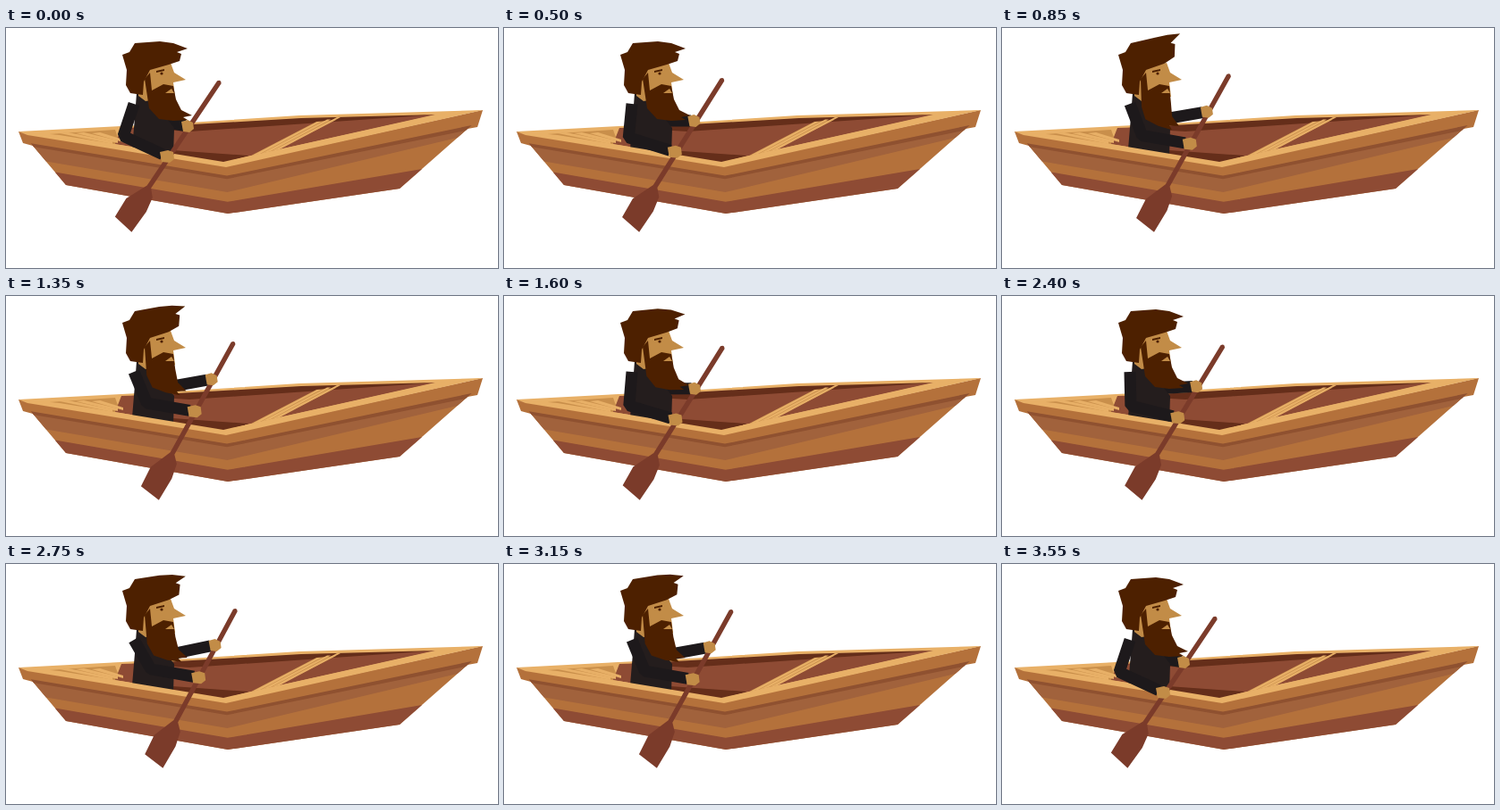
Write an HTML page that moves like this. It is 550 px wide and 269 px high and loops after 3600 ms.

```html
<!DOCTYPE html>
<html lang="en">
<head>
<meta charset="utf-8">
<title>Rowing</title>
<style>
  html, body { margin: 0; width: 100%; height: 100%; overflow: hidden; background: #fff; }
  svg { display: block; width: 550px; height: 269px; }
  .light { fill: #e8b067; } .oak { fill: #c98f4b; } .wood { fill: #b4713b; }
  .dark { fill: #8e4b34; } .shade { fill: #652e1a; }
  .skin { fill: #c28c47; } .hair { fill: #4d2000; } .oar { fill: #7b3b2a; }
  .coat { fill: #241d1d; }
  .sleeve { fill: none; stroke: #1d191b; stroke-width: 13; stroke-linejoin: bevel; }
</style>
</head>
<body>
<svg viewBox="0 0 550 269">
  <path class="light" d="M14 116L205 106 328 98 533 92 243 152Z"/>
  <path class="oak" d="M48 119L122 114 128 131Z"/>
  <path class="dark" d="M129 112L205 110 482 97 243 150 122 130Z"/>
  <path class="shade" d="M140 112L330 101 482 97 205 116Z"/>
  <path class="shade" d="M186 137L272 143 243 151 186 142Z"/>
  <path class="oak" d="M274 143L347 105 369 103 302 137Z"/>
  <g id="planks" class="light"></g>
  <path id="farArm" class="sleeve"/>
  <path class="coat" d="M146 73L144 100 141 136 187 144 188 112 160 76Z"/>
  <path class="wood" d="M14 116L19 129 30 132 247 168 516 113 527 111 533 92 246 155Z"/>
  <g id="hull"></g>
  <path class="light" d="M14 116L60 120 243 150 480 97 533 92 246 156 24 120Z"/>
  <path id="oar" class="oar" d="M-2.7-95Q0-99 2.7-95L2.7 46 10 54 13 71 12 99-13 95-14 71-2.7 46Z"/>
  <path id="farHand" class="skin" d="M-7-5L0-7 6-4 7 3 2 7-5 6Z"/>
  <path class="skin" d="M148 54L164 43 184 39 188 50 201 58 187 61 189 77 156 82 148 76Z"/>
  <path id="beard" class="hair"/>
  <path class="skin" d="M178 73L185 68 188 73Z"/>
  <path class="hair" d="M168 48L177 46 177 48 168 50Z"/>
  <circle class="hair" cx="174" cy="51" r="1.6"/>
  <path id="hair" class="hair"/>
  <path id="nearArm" class="sleeve"/>
  <path id="nearHand" class="skin" d="M-8-5L1-7 7-5 8 3 3 7-6 6Z"/>
</svg>
<script>
const LOOP = 3600, STEP = 50, STROKE = 1800, GUST = 605;
const $ = id => document.getElementById(id);
const clamp = x => Math.max(0, Math.min(1, x));
const mix = (a, b, k) => a + (b - a) * k;
const mixPt = (a, b, k) => [mix(a[0], b[0], k), mix(a[1], b[1], k)];
const line = pts => 'M' + pts.map(p => p.map(n => n.toFixed(2)).join(' ')).join('L');
const place = (id, [x, y], deg = 0) =>
  $(id).setAttribute('transform', `translate(${x} ${y}) rotate(${deg})`);
const shape = (id, pts) => $(id).setAttribute('d', line(pts));

// Hull boards are V strips between seam (0) and keel (1).
const rib = (f, bow = f) => [
  mixPt([30, 132], [67, 176], f), mixPt([247, 168], [248, 208], f), mixPt([516, 113], [440, 180], bow)];
const board = (fill, top, end, bow) =>
  `<path fill="${fill}" d="${line([...rib(top), ...rib(end, bow).reverse()])}Z"/>`;
$('hull').innerHTML = board('#b4713b', 0, 1) + board('#a1623c', -0.04, 0.4, 0.15) +
  board('#8f5130', -0.06, 0.03) + board('#8e4b34', 0.67, 1);

// Light grain on the seat and the stern boards.
let grain = '';
for (let i = 0; i < 3; i++) {
  const x = 275 + 11 * i, y = 143 - 2.5 * i, s = 60 + 18 * i;
  grain += `<path d="M${x} ${y}L${x + 73} ${y - 38} ${x + 77} ${y - 38} ${x + 9} ${y - 2}Z"/>` +
    `<path d="M${s} 118l9-1 ${50 - 12 * i} ${10 - i} 0 3Z"/>`;
}
$('planks').innerHTML = grain;

const hair = [[153, 75], [139, 73], [134, 64], [135, 47], [130, 30], [138, 27], [144, 17], [172, 15],
  [187, 17], [203, 23], [191, 27], [196, 29], [194, 37], [182, 41], [161, 47], [154, 60]];
const beard = [[155, 57], [161, 50], [163, 70], [176, 63], [187, 65], [190, 80], [196, 92], [208, 98],
  [198, 100], [203, 103], [187, 104], [171, 102], [160, 90]];

// The front of the hair lifts; the beard swings about the chin.
const lift = g => ([x, y]) => {
  const w = g * clamp((x - 140) / 63) ** 2 * clamp((44 - y) / 18);
  return [x - 4 * w, y - 17 * w];
};
const swing = g => ([x, y]) => {
  const a = 0.36 * g * clamp((y - 68) / 34), dx = x - 165, dy = y - 72;
  return [165 + dx * Math.cos(a) - dy * Math.sin(a), 72 + dx * Math.sin(a) + dy * Math.cos(a)];
};

// Rest, pull forward, swing back.
function reach(t) {
  const u = t % STROKE;
  return u < 1150 ? clamp((u - 300) / 850) : clamp((1750 - u) / 600);
}

function gust(t) {
  const d = Math.abs((t + 77) % GUST - GUST / 2);
  return (1 + Math.cos(Math.PI * clamp(d / 220))) / 2;
}

// Elbow of a two-bone arm, bent down and back.
function elbow(s, h, l1, l2) {
  const dx = h[0] - s[0], dy = h[1] - s[1], d = Math.hypot(dx, dy);
  const a = (l1 * l1 - l2 * l2 + d * d) / (2 * d);
  const b = Math.sqrt(Math.max(0, l1 * l1 - a * a));
  return [s[0] + (dx * a - dy * b) / d, s[1] + (dy * a + dx * b) / d];
}

function draw(t) {
  const k = reach(t), g = gust(t);
  const near = mixPt([180, 144], [226, 122], k), far = mixPt([203, 110], [243, 85], k);
  const shoulder = [143, 85], farShoulder = [170, 104];
  const bend = elbow(shoulder, near, 38, 54);
  place('oar', mixPt([185.5, 139.7], [219.5, 134.5], k), mix(33.8, 26.4, k));
  place('nearHand', near);
  place('farHand', far);
  shape('farArm', [farShoulder, mixPt(farShoulder, far, 0.92)]);
  shape('nearArm', [shoulder, bend, mixPt(bend, near, 0.9)]);
  shape('hair', hair.map(lift(g)));
  shape('beard', beard.map(swing(g)));
}

const start = performance.now();
function tick() {
  const t = (performance.now() - start) % LOOP;
  draw(Math.floor(t / STEP) * STEP);
  requestAnimationFrame(tick);
}
tick();
</script>
</body>
</html>
```
